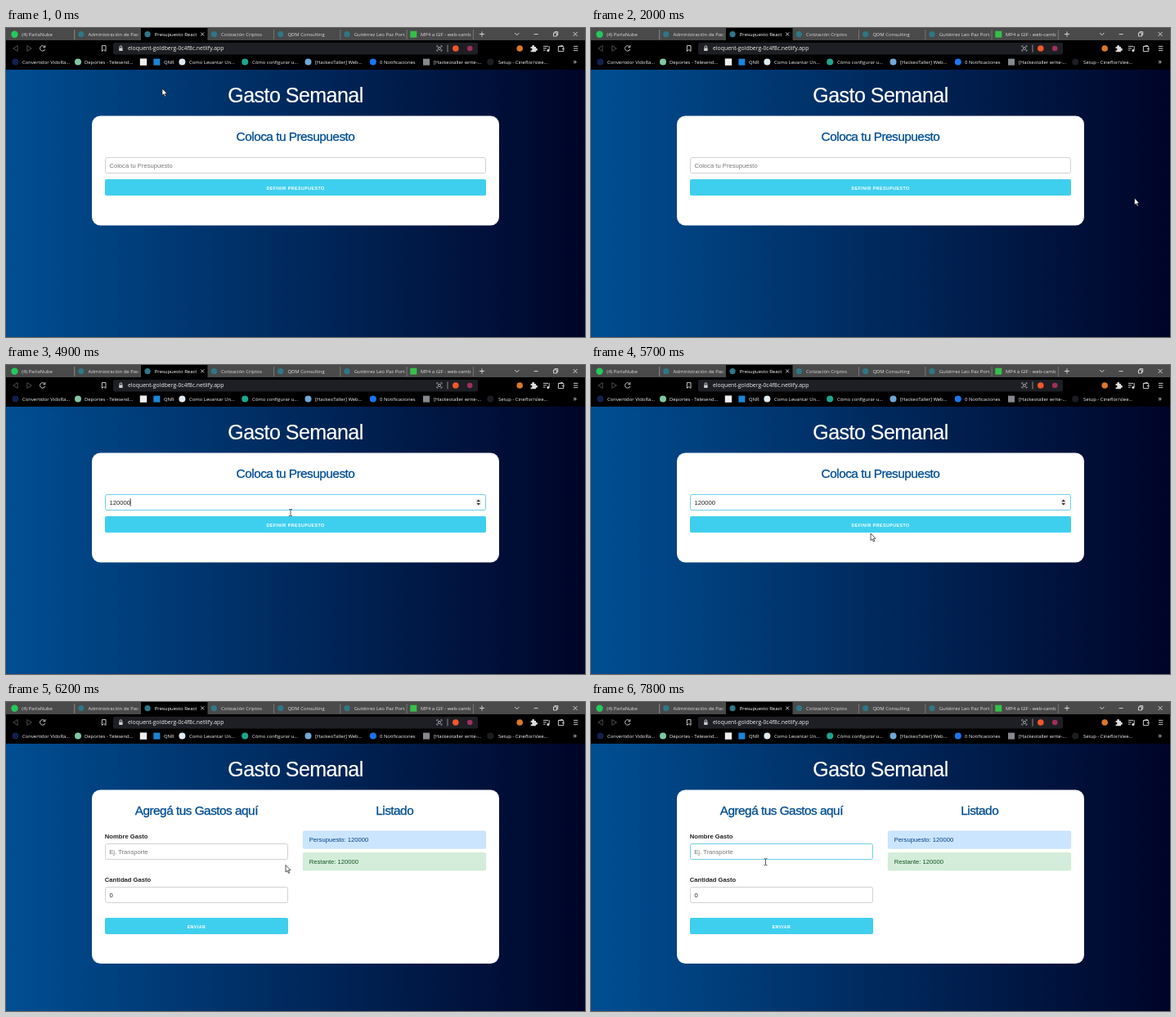
An HTML page that plays this animation: 708x378 px, repeating every 8 s.

```html
<!DOCTYPE html>
<html lang="es">
<head>
<meta charset="utf-8">
<title>Gasto Semanal</title>
<style>
  html, body { margin: 0; width: 100%; height: 100%; overflow: hidden; background: #000428; }
  svg { display: block; }
  text { white-space: pre; }
  .ui { font-family: "Open Sans", "Noto Sans", sans-serif; fill: #f0f0f0; }
  .page { font-family: "Liberation Sans", Arial, sans-serif; font-size: 7.65px; fill: #222; }
  .h1 { font-size: 25px; letter-spacing: -.52px; fill: #fff; stroke: #fff; stroke-width: .2; }
  .h2 { font-size: 15.4px; letter-spacing: -.52px; fill: #004e92; stroke: #004e92; stroke-width: .3; }
  .btn { font-size: 5.2px; font-weight: 700; letter-spacing: .52px; fill: #fff; }
  .bold { font-weight: 700; }
  .hint { fill: #777; }
  .line { fill: none; stroke: #ddd; stroke-width: .9; }
</style>
</head>
<body>
<svg id="stage" width="708" height="378" viewBox="0 0 708 378"></svg>
<script>
const LOOP = 8000;
const FONT = 7.65;
const FOCUS = '#6fcfe6', IDLE = '#d1d1d1';

const rect = (x, y, w, h, fill, more = '') =>
  `<rect x="${x}" y="${y}" width="${w}" height="${h}" fill="${fill}" ${more}/>`;
const dot = (x, y, r, fill) => `<circle cx="${x}" cy="${y}" r="${r}" fill="${fill}"/>`;
const line = (d, more = '') => `<path class="line" d="${d}" ${more}/>`;
const label = (x, y, s, size, more = '') =>
  `<text class="ui" x="${x}" y="${y}" font-size="${size}" ${more}>${s}</text>`;
const text = (x, y, s, cls = '', more = '') =>
  `<text class="page ${cls}" x="${x}" y="${y}" ${more}>${s}</text>`;
const mid = (x, y, s, cls) => text(x, y, s, cls, 'text-anchor="middle"');
const field = (id, x, y, w) =>
  rect(x + .5, y + .5, w - 1, 19, '#fff', `id="${id}" rx="2" stroke="${IDLE}"`);
const button = (id, x, y, w, s) =>
  rect(x, y, w, 20, '#3fcfee', `id="${id}" rx="2"`) + mid(x + w / 2, y + 12.6, s, 'btn');
const alertBox = (y, fill, edge, color, s) =>
  rect(363.3, y + .3, 223.4, 21.4, fill, `rx="1.5" stroke="${edge}" stroke-width=".6"`) +
  text(370.7, y + 13.7, s, '', `style="fill:${color}"`);
const caret = (id, y) => rect(126.4, y, .8, 9.4, '#111', `id="${id}"`);

function tabBar() {
  const tabs = [
    ['#25c95c', '(4) ParlaNube'], ['#2f7688', 'Administración de Pacientes'],
    ['#2f7688', 'Presupuesto React'], ['#2f7688', 'Cotización Criptos'],
    ['#2f7688', 'QDM Consulting'], ['#2f7688', 'Gutiérrez Leo Paz Portafolio'],
    ['#35c04a', 'MP4 a GIF - web-cambio']
  ];
  let out = rect(0, 0, 708, 15, '#4a4a4a');
  tabs.forEach(([color, s], i) => {
    const x = 2 + i * 81.3, on = i === 2;
    if (on) out += rect(165, 0, 81.5, 15, '#000');
    else if (i !== 1) out += line(`M${x + 81.6} 2V14`, 'style="stroke:#8a8a8a;stroke-width:.7"');
    out += i === 6 ? rect(x + 4.5, 3.7, 8, 8, color) : dot(x + 8.5, 7.7, i ? 3.6 : 4.2, color);
    out += `<svg x="${x + 17}" y="0" width="62" height="15">` +
      label(.2, 9.9, s, 5.95, `style="fill:${on ? '#fff' : '#dcdcdc'}"`) + '</svg>';
  });
  return out +
    line('M83.8 2V14', 'style="stroke:#8a8a8a;stroke-width:.7"') +
    line('M238.2 5.5l4 4m0-4l-4 4M578.9 7.5h6.2M582 4.4v6.2') +
    line('M622.2 6l2.6 2.8L627.4 6M645.6 7.6h5M669.5 6h4v4h-4zM671 6V4.6h3.8v4H673.5M693.6 5l5 5m0-5l-5 5');
}

function toolBar() {
  return rect(0, 15, 708, 36, '#000') +
    rect(131, 18, 446, 14.5, '#1e1f24', 'rx="2"') +
    line('M14.2 21.6L8.8 25l5.4 3.4zM25.8 21.6l5.4 3.4-5.4 3.4z', 'style="stroke:#555"') +
    line('M47 22.6A3.2 3.2 0 1 0 47.8 26M47.9 21.2v2.6h-2.6') +
    line('M117.4 21.6h4.6v6.8l-2.3-1.9-2.3 1.9z') +
    rect(138.2, 24.4, 4.4, 3.6, '#ccc') + line('M139.1 24.4v-1.3a1.3 1.3 0 0 1 2.6 0v1.3') +
    label(149, 27.3, 'eloquent-goldberg-0c4f8c.netlify.app', 6.87) +
    line('M526.8 23.4v-1.6h1.6m3 0h1.6v1.6m0 3v1.6h-1.6m-3 0h-1.6v-1.6M528.6 23.5h2.6v2.8h-2.6z',
      'style="stroke:#bbb;stroke-width:.8"') +
    line('M540 20.5v9', 'style="stroke:#999"') +
    dot(549.8, 25, 3.8, '#f2572b') + dot(567.2, 25, 3.3, '#a02f5b') +
    dot(628.2, 25, 3.8, '#d9772b') +
    '<path fill="#ddd" d="M641.6 23h1.8a1.4 1.4 0 1 1 2.6 0h2v2a1.4 1.4 0 1 1 0 2.6v1.6h-6.4v-1.8a1.3 1.3 0 1 0 0-2.4z"/>' +
    line('M657 22.4h6M657 24.8h4M657 27.2h2.6M664.2 22v5.2') + dot(662.9, 27.4, 1.5, '#ddd') +
    line('M675.4 22.6h6.4v6h-6.4zM675.4 22.6l5-1.3v1.3M679.8 25.6h2.8') +
    line('M694 22.4h5.4M694 25h5.4M694 27.6h5.4');
}

function bookmarks() {
  const items = [
    [11.5, '#12204f', 20, 'Convertidor VidoRa...'], [88, '#7fc8a0', 96, 'Deportes - Telesend...'],
    [184.4, '#1a86d8', 193, 'QNR', 1], [215.4, '#dfe9f2', 224, 'Como Levantar Un...'],
    [292.2, '#1fa58d', 301, 'Cómo configurar u...'], [369.5, '#6fa9d8', 378, '[HackeoTaller] Web...'],
    [448.8, '#1877f2', 457, '0 Notificaciones'], [514, '#85898e', 523, '[Hackeotaller write-...', 1],
    [592.3, '#1b1d22', 602, 'Setup - Cineflor/slee...']
  ];
  return rect(163.8, 37.4, 8.4, 8.4, '#eee') + items.map(([x, color, tx, s, square]) =>
    (square ? rect(x - 4, 37.6, 8, 8, color) : dot(x, 41.6, 4, color)) + label(tx, 43.8, s, 5.9)
  ).join('') + label(693.6, 44, '»', 9);
}

const card = h => rect(105, 107.5, 498, h, '#fff', 'rx="10.4"');

const budget = '<g id="budget">' + card(134) +
  mid(354, 138, 'Coloca tu Presupuesto', 'h2') +
  field('amount', 121, 158, 466) +
  text(126.4, 171, 'Coloca tu Presupuesto', 'hint', 'id="hint"') +
  text(126.4, 171, '', '', 'id="typed"') + caret('caret1', 163.4) +
  '<g id="spin">' + rect(574.2, 163.6, 7, 9, '#efefef', 'rx="1"') +
  '<path fill="#333" d="M575.4 167.2l2.3-2.6 2.3 2.6zM575.4 169l2.3 2.6 2.3-2.6z"/></g>' +
  button('define', 121, 185, 466, 'DEFINIR PRESUPUESTO') + '</g>';

const spending = '<g id="spending">' + card(212.5) +
  mid(232.8, 138, 'Agregá tus Gastos aquí', 'h2') + mid(475.2, 138, 'Listado', 'h2') +
  text(120.8, 166.6, 'Nombre Gasto', 'bold') + field('name', 121, 173, 224) +
  text(126.2, 186, 'Ej. Transporte', 'hint') + caret('caret2', 178.4) +
  text(120.8, 219.6, 'Cantidad Gasto', 'bold') + field('cost', 121, 226, 224) +
  text(126.4, 239, '0') + button('send', 121, 264, 224, 'ENVIAR') +
  alertBox(157.6, '#cce5ff', '#b8daff', '#004085', 'Persupuesto: 120000') +
  alertBox(184.2, '#d4edda', '#c3e6cb', '#155724', 'Restante: 120000') + '</g>';

const pointers =
  '<path id="arrow" d="M0 0V8.6L2 6.8 3.4 10 4.8 9.4 3.4 6.3H6z" fill="#fff" stroke="#111" stroke-width=".7"/>' +
  '<path id="beam" d="M-2-4H-.5L0-3.6.5-4H2M0-3.6V3.6M-2 4H-.5L0 3.6.5 4H2" fill="none" stroke="#333" stroke-width=".8"/>' +
  '<path id="hand" d="M-1.2-4.4q1-1 2 0V-1l4 .9q.9.4.8 1.6L5 4.2 4.2 6.8H-.4L-3.6 2.6q-.6-1.4.6-1.6L-1.2 2.2z" fill="#fff" stroke="#111" stroke-width=".8"/>';

const stage = document.getElementById('stage');
stage.innerHTML =
  '<defs><linearGradient id="sky"><stop stop-color="#004e92"/><stop offset="1" stop-color="#000428"/></linearGradient></defs>' +
  rect(0, 51, 708, 327, 'url(#sky)') + mid(354, 91, 'Gasto Semanal', 'h1') +
  budget + spending + tabBar() + toolBar() + bookmarks() + pointers;

const $ = {};
stage.querySelectorAll('[id]').forEach(e => $[e.id] = e);

// [start in ms, value]; each value holds until the next step
const pointer = [
  [0, ['arrow', 191, 74]], [1600, ['arrow', 684, 134]], [1900, ['arrow', 675, 182]],
  [2000, ['arrow', 664.5, 208]], [2100, ['arrow', 661, 212]], [2200, ['arrow', 642, 206]],
  [2300, ['arrow', 600, 194]], [2400, ['arrow', 480, 180]], [2500, ['beam', 347, 169]],
  [3200, ['beam', 348, 176]], [3300, ['beam', 348, 180.5]], [5600, ['arrow', 344, 206]],
  [5700, ['arrow', 342, 206]], [5900, ['hand', 344.8, 204]], [6200, ['arrow', 342, 199.4]],
  [6600, ['arrow', 300, 196]], [6700, ['beam', 223, 183]], [6900, ['beam', 217, 189]],
  [7000, ['beam', 213.5, 195.6]]
];
const typing = [[0, 0], [3700, 1], [3800, 2], [3900, 3], [4100, 4], [4300, 5], [4800, 6]];
const blink1 = [[0, 0], [2700, 1], [3200, 0], [3700, 1], [5400, 0], [5900, 1], [6000, 0]];
const blink2 = [[0, 0], [7200, 1], [7800, 0]];

const at = (steps, t) => steps.findLast(s => s[0] <= t)[1];
const within = (t, a, b) => t >= a && t < b;
const show = (e, on) => { e.style.display = on ? '' : 'none'; };

function draw(t) {
  const count = at(typing, t);
  show($.budget, t < 6200);
  show($.spending, t >= 6200);
  show($.hint, !count);
  $.typed.textContent = '120000'.slice(0, count);
  $.caret1.setAttribute('x', 126.2 + count * FONT * .556);
  show($.caret1, at(blink1, t));
  show($.caret2, at(blink2, t));
  show($.spin, within(t, 2500, 6000));
  $.amount.setAttribute('stroke', within(t, 2700, 6000) ? FOCUS : IDLE);
  $.name.setAttribute('stroke', t >= 7000 ? FOCUS : IDLE);
  $.define.setAttribute('fill', t >= 5900 ? '#29b8d8' : '#3fcfee');

  const [kind, x, y] = at(pointer, t);
  for (const k of ['arrow', 'beam', 'hand']) show($[k], k === kind);
  $[kind].setAttribute('transform', `translate(${x} ${y})`);
}

const start = performance.now();
function tick() {
  draw((performance.now() - start) % LOOP);
  requestAnimationFrame(tick);
}
tick();
</script>
</body>
</html>
```
